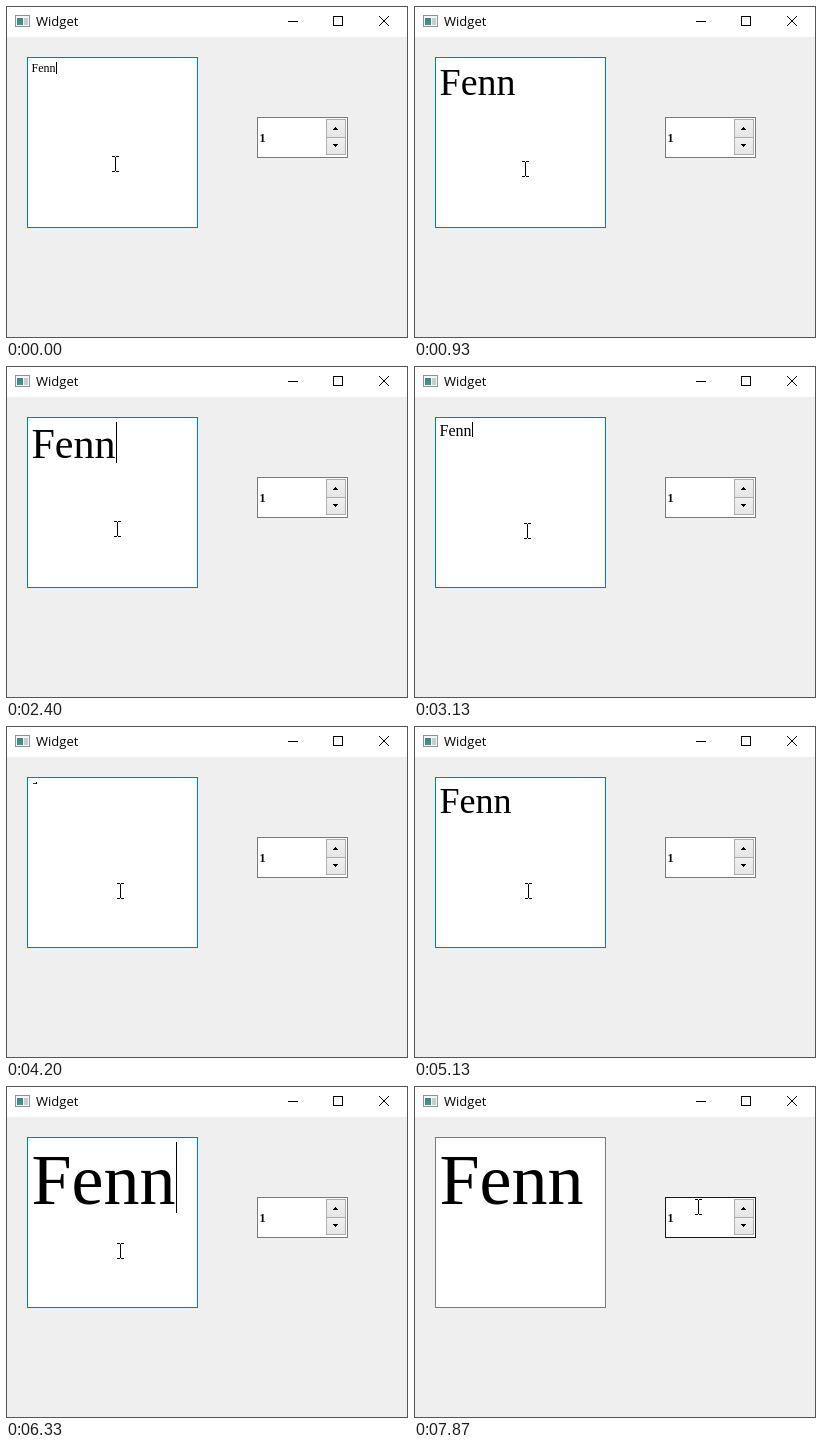
These frames come from a looping animation (402x332 px, 8 s). An HTML page:

```html
<!DOCTYPE html>
<html lang="en">
<head>
<meta charset="utf-8">
<title>Widget</title>
<style>
  html, body { margin: 0; width: 100%; height: 100%; overflow: hidden; background: #efefef; }
  svg { display: block; width: 402px; height: 332px; shape-rendering: crispEdges; }
  .ui { font: 13px "Open Sans", "Noto Sans", sans-serif; }
  .doc { font-family: "Liberation Serif", "Noto Serif", serif; font-kerning: none; }
</style>
</head>
<body>
<svg viewBox="0 0 402 332">
  <defs>
    <linearGradient id="pane" x2="0" y2="1">
      <stop stop-color="#3d7f8c"/><stop offset="1" stop-color="#3f9a78"/>
    </linearGradient>
    <linearGradient id="button" x2="0" y2="1">
      <stop stop-color="#f0f0f0"/><stop offset="1" stop-color="#e5e5e5"/>
    </linearGradient>
  </defs>
  <rect width="402" height="332" fill="#efefef"/>
  <rect width="402" height="31" fill="#fff"/>
  <rect x=".5" y=".5" width="401" height="331" fill="none" stroke="#555"/>

  <g>
    <rect x="9.5" y="9.5" width="14" height="11" fill="#f4f6f7" stroke="#8b959b"/>
    <rect x="11" y="12" width="6" height="7" fill="url(#pane)"/>
    <rect x="18" y="12" width="4" height="7" fill="#c5ced2"/>
  </g>
  <text class="ui" x="30" y="20">Widget</text>

  <rect x="282" y="15" width="10" height="1"/>
  <rect x="327.5" y="10.5" width="9" height="9" fill="none" stroke="#000"/>
  <path d="M373 10l10 10M383 10l-10 10" stroke="#000" shape-rendering="auto"/>

  <rect id="edit" x="21.5" y="51.5" width="170" height="170" fill="#fff"/>
  <text id="word" class="doc" x="25.5">Fenn</text>
  <rect id="smudge" x="27" y="57" width="4" height="1" fill="#333"/>
  <rect id="caret" y="56" width="1"/>

  <rect id="spin" x="251.5" y="111.5" width="90" height="40" fill="#fff"/>
  <g fill="url(#button)" stroke="#adadad">
    <rect x="320.5" y="113.5" width="19" height="18"/>
    <rect x="320.5" y="131.5" width="19" height="17"/>
  </g>
  <path d="M329 121h1v1h1v1h1v1h-5v-1h1v-1h1zM327 138h5v1h-1v1h-1v1h-1v-1h-1v-1h-1z"/>
  <text class="doc" x="253.5" y="136" font-size="12" font-weight="bold">1</text>
  <rect id="spinCaret" x="260" y="126" width="1" height="12"/>

  <g id="mouse">
    <path id="beam" d="M-3 0h3v1h-3zM1 0h3v1h-3zM0 1h1v14h-1zM-3 15h3v1h-3zM1 15h3v1h-3z"/>
    <path id="arrow" d="M.5 7.5v16l4-4 3 6 2-1-3-6h5z" fill="#fff" stroke="#000" shape-rendering="auto"/>
  </g>
</svg>
<script>
const LOOP = 8000, RATE = 15 / 1000;   // ticks per ms
const LEFT = 26, TOP = 56, ASCENT = 0.859;
const LEAVE = 103, CLICK = 110, BLINK = 8;   // in ticks

// Wheel bursts: [first tick, last tick, font size reached]
const zooms = [
  [2, 10, 34], [13, 15, 42], [18, 22, 60], [29, 33, 47], [35, 39, 26], [42, 44, 16],
  [49, 53, 2], [63, 64, 8], [69, 72, 24], [75, 77, 36], [78, 84, 56], [87, 92, 72]
];

// Pointer moves: [first tick, last tick, x, y]
const glides = [[3, 10, 111, 155], [35, 39, 113, 157], [49, 53, 114, 157], [101, 109, 284, 113]];

const $ = id => document.getElementById(id);
const set = (id, attrs) => {
  for (const k in attrs) $(id).setAttribute(k, attrs[k]);
};
const show = (id, on) => set(id, { visibility: on ? "visible" : "hidden" });

const linear = p => p;
const smooth = p => p * p * (3 - 2 * p);

// Carries the start values through every move up to the given tick.
function follow(values, moves, tick, ease) {
  for (const [from, to, ...goal] of moves) {
    const p = ease(Math.min(1, Math.max(0, (tick - from) / (to - from))));
    values = values.map((v, i) => v + (goal[i] - v) * p);
  }
  return values.map(Math.round);
}

const caretOn = ticks => Math.floor(ticks / BLINK) % 2 === 0;

function draw(tick) {
  const [size] = follow([12], zooms, tick, linear);
  const [x, y] = follow([109, 150], glides, tick, smooth);
  const inEdit = x < 192, inSpin = x > 251;

  set("word", { "font-size": size, y: TOP + ASCENT * size });
  show("word", size > 3);
  show("smudge", size <= 3);
  set("caret", { x: LEFT + 2 * size, height: size > 12 ? size - 1 : size });
  show("caret", tick < LEAVE && caretOn(tick + 1));

  set("edit", { stroke: tick < CLICK ? "#0078d7" : "#7a7a7a" });
  set("spin", { stroke: inSpin ? "#171717" : "#7a7a7a" });
  show("spinCaret", tick >= CLICK && caretOn(tick - CLICK));

  set("mouse", { transform: `translate(${x} ${y})` });
  show("beam", inEdit || inSpin);
  show("arrow", !inEdit && !inSpin);
}

const start = performance.now();
function frame() {
  const t = (performance.now() - start) % LOOP;
  draw(Math.floor(t * RATE + 0.06));
  requestAnimationFrame(frame);
}
frame();
</script>
</body>
</html>
```
